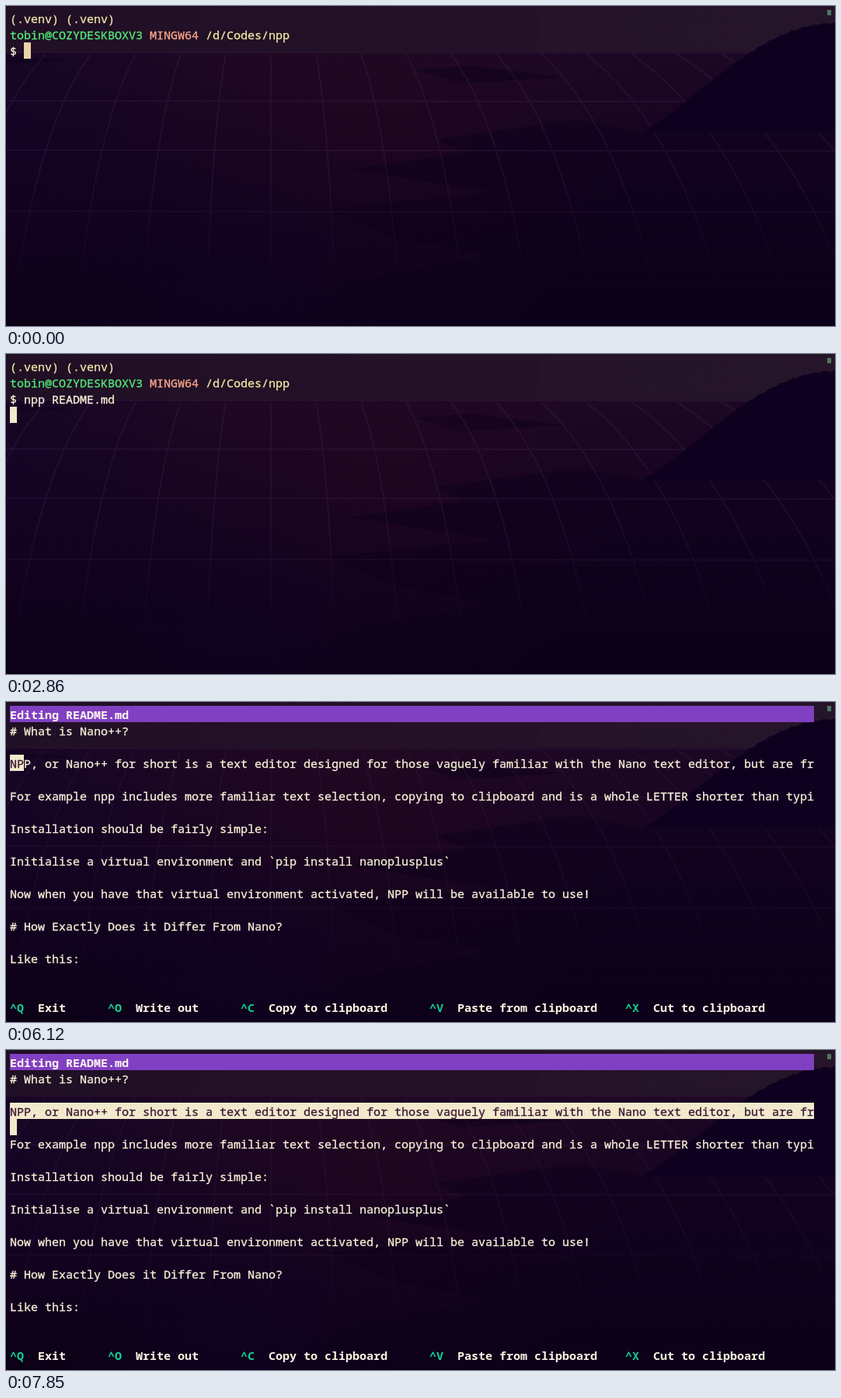
These frames come from a looping animation (1067 by 413 pixels, 8 s). An HTML page with a canvas:

```html
<!DOCTYPE html>
<html lang="en">
<head>
<meta charset="utf-8">
<style>
  html, body { margin: 0; width: 100%; height: 100%; overflow: hidden; background: #0d0118; }
  canvas { display: block; }
</style>
</head>
<body>
<canvas id="stage" width="1067" height="413"></canvas>
<script>
const W = 1067, H = 413, CELL = 9, ROW = 21, PAD = 5, LOOP = 8000;
const ctx = document.getElementById('stage').getContext('2d');
const CREAM = '#fbf3da', BLOCK = '#f1e9cc', INK = '#3a1630', HILL = '#0e0120';
const ENTER = 2860, OPEN = 3190, SELECT_LINE = 7850;

// Bursts of typing: letters, time of the first and of the last key
const BURSTS = [
  ['np', 740, 800], ['p', 1010, 1010], [' RE', 1210, 1470],
  ['ADME', 1740, 2070], ['.', 2330, 2330], ['md', 2600, 2660]
];
const DOC = [
  '# What is Nano++?', '',
  'NPP, or Nano++ for short is a text editor designed for those vaguely familiar with the Nano text editor, but are fr', '',
  'For example npp includes more familiar text selection, copying to clipboard and is a whole LETTER shorter than typi', '',
  'Installation should be fairly simple:', '',
  'Initialise a virtual environment and `pip install nanoplusplus`', '',
  'Now when you have that virtual environment activated, NPP will be available to use!', '',
  '# How Exactly Does it Differ From Nano?', '',
  'Like this:'
];
const MENU = [
  [0, '^Q', 'Exit'], [14, '^O', 'Write out'], [33, '^C', 'Copy to clipboard'],
  [60, '^V', 'Paste from clipboard'], [88, '^X', 'Cut to clipboard']
];

// How many of n evenly spaced key presses have happened
function presses(t, first, last, n) {
  if (t < first) return 0;
  return t >= last ? n : 1 + Math.floor((t - first) * (n - 1) / (last - first));
}

function text(col, row, str, color, bold) {
  const x = PAD + col * CELL, y = PAD + row * ROW + 17;
  ctx.font = (bold ? 'bold ' : '') + '15px "Noto Sans Mono", monospace';
  ctx.fillStyle = ctx.strokeStyle = color;
  ctx.lineWidth = 0.3;
  ctx.fillText(str, x, y);
  if (!bold) ctx.strokeText(str, x, y);
}

function block(col, row, count, color) {
  ctx.fillStyle = color;
  ctx.fillRect(PAD + col * CELL, PAD + row * ROW, count * CELL, ROW);
}

// Inverted run of cells from the line start
function invert(row, count) {
  block(0, row, count, BLOCK);
  text(0, row, DOC[row - 1].slice(0, count), INK);
}

function makeBackdrop(gridAlpha) {
  const canvas = document.createElement('canvas');
  canvas.width = W;
  canvas.height = H;
  const g = canvas.getContext('2d');

  const gradient = (grad, ...colors) => {
    colors.forEach((color, i) => grad.addColorStop(i / (colors.length - 1), color));
    return grad;
  };
  const area = (color, y, h) => {
    g.fillStyle = color;
    g.fillRect(0, y, W, h);
  };
  const shape = (color, ...pts) => {
    g.fillStyle = color;
    g.beginPath();
    for (let i = 0; i < pts.length; i += 2) g.lineTo(pts[i], pts[i + 1]);
    g.fill();
  };
  const glow = (x, y, r, rgb, alpha) =>
    area(gradient(g.createRadialGradient(x, y, 0, x, y, r), `rgba(${rgb},${alpha})`, `rgba(${rgb},0)`), 60, H);

  area(gradient(g.createLinearGradient(0, 60, 0, H), '#1d0824', '#170420', '#11021c', '#0c0117'), 0, H);
  glow(480, 130, 330, '46,8,30', 0.3);
  glow(0, 150, 260, '16,2,38', 0.5);
  glow(300, 370, 230, '16,3,40', 0.45);
  area(gradient(g.createLinearGradient(0, 0, W, 0), '#200f25', '#241127', '#251329'), 0, 59);
  shape('rgba(60,40,58,.08)', 691, 0, W, 0, W, 59, 682, 59);

  // Shadow of the hill, with a jagged edge
  const dark = 'rgba(13,1,28,.45)';
  shape(dark, 735, 147, 553, 172, 590, 190, 440, 211, 632, 240, 415, 262, 500, 300,
    625, 322, 430, 358, 400, H, W, H, W, 162, 817, 162);
  shape(dark, 525, 82, 600, 77, 720, 92, 585, 100);
  shape(dark, 0, 63, 85, 71, 0, 75);

  // Floor grid, spreading from one vertical
  const line = alpha => `rgba(106,72,128,${alpha})`;
  g.strokeStyle = gradient(g.createLinearGradient(0, 62, 0, 370), line(gridAlpha), line(gridAlpha), line(0));
  g.lineWidth = 1.5;
  g.beginPath();
  for (let i = -6; i <= 10; i++) {
    g.moveTo(341 + 58 * i, 62);
    g.quadraticCurveTo(341 + 74 * i, 150, 341 + 82 * i, 360);
  }
  for (const y of [59.5, 122.5, 186, 265, 357]) {
    g.moveTo(0, y);
    g.lineTo(W, y + 1);
  }
  g.stroke();

  const ridge = [];
  for (let x = 817; x <= W; x += 5) {
    const rise = Math.sin((x - 817) / 250 * Math.PI / 2) ** 1.22;
    ridge.push(x, 163 - 141 * rise + Math.sin(x * 1.7));
  }
  shape(HILL, ...ridge, W, 163);

  g.fillStyle = '#4d7560';
  g.fillRect(1057, 5, 5, 7);
  return canvas;
}

const shellBack = makeBackdrop(0.17);
const editorBack = makeBackdrop(0.11);

function drawShell(t) {
  ctx.drawImage(shellBack, 0, 0);
  text(0, 0, '(.venv) (.venv)', '#f2eaa8');
  text(0, 1, 'tobin@COZYDESKBOXV3', '#52ec76');
  text(20, 1, 'MINGW64', '#fca68a');
  text(28, 1, '/d/Codes/npp', '#f4eda6');
  const typed = BURSTS.map(([keys, first, last]) =>
    keys.slice(0, presses(t, first, last, keys.length))).join('');
  text(0, 2, '$ ' + typed, CREAM);
  if (t < ENTER) block(2 + typed.length, 2, 1, typed ? '#f6ead0' : '#ecd3a6');
  else block(0, 3, 1, BLOCK);
}

function drawEditor(t) {
  ctx.drawImage(editorBack, 0, 0);
  block(0, 0, 115, '#8140c2');
  text(0, 0, 'Editing README.md', '#fff8f0', true);
  DOC.forEach((str, i) => text(0, i + 1, str, CREAM));
  for (const [col, key, label] of MENU) {
    text(col, 18, key, '#14cf95', true);
    text(col + 4, 18, label, '#fbf3e2', true);
  }

  const row = 1 + presses(t, 4390, 4660, 3) - presses(t, 5390, 5390, 1);
  const letters = 1 + presses(t, 6120, 6250, 2);
  const jumps = presses(t, 6790, 7580, 13) + presses(t, 7650, 7720, 2);
  const whole = t >= SELECT_LINE;
  invert(row, whole ? DOC[2].length : letters + 2 * jumps);
  if (whole) invert(row + 1, 1);
}

const start = performance.now();
function frame() {
  const t = (performance.now() - start) % LOOP;
  (t < OPEN ? drawShell : drawEditor)(t);
  requestAnimationFrame(frame);
}
frame();
</script>
</body>
</html>
```
